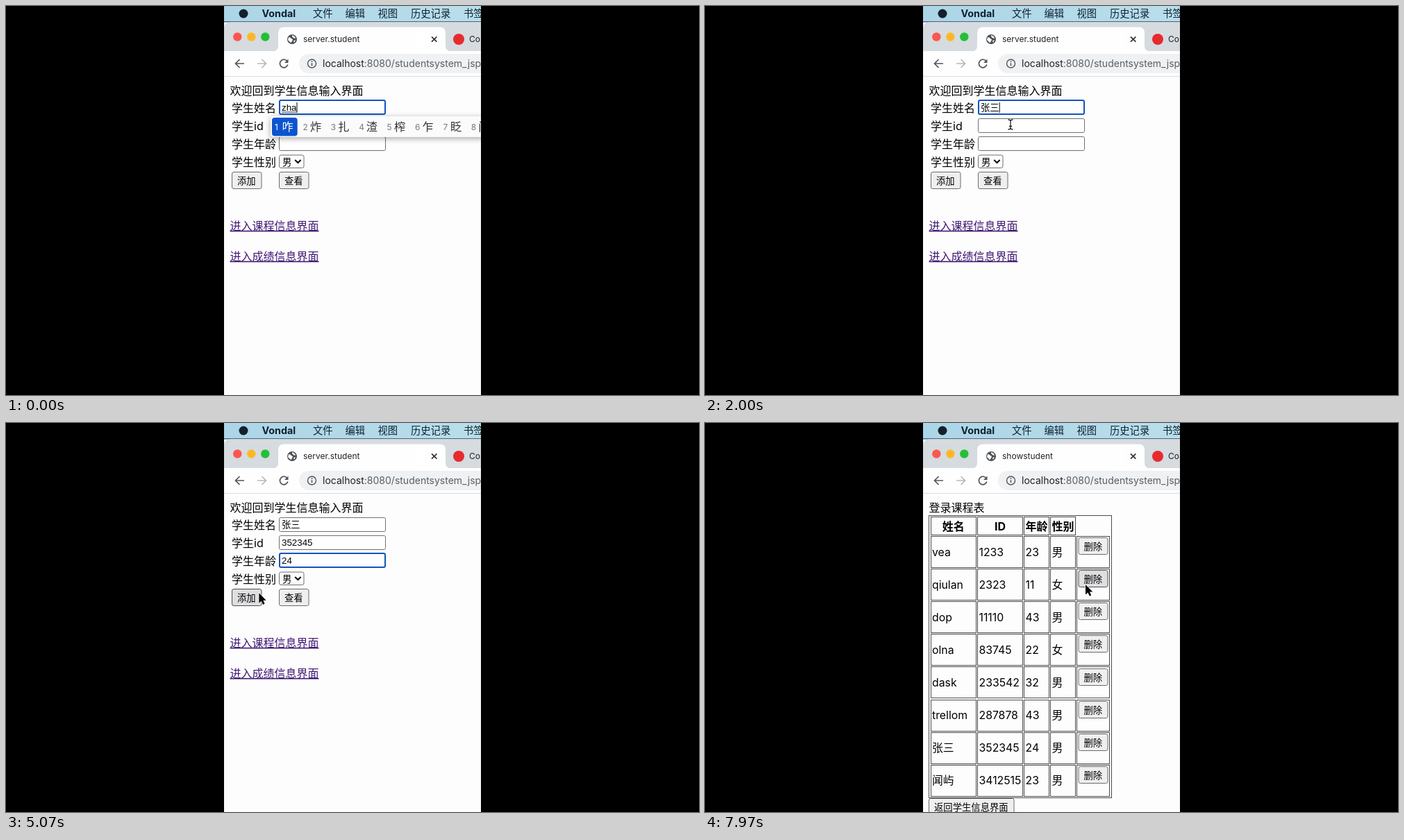
Animation of 998x561 px, one loop 8 s. Source, as an HTML page:

```html
<!DOCTYPE html>
<html lang="zh-CN">
<head>
<meta charset="utf-8">
<title>Student form</title>
<style>
html, body { margin: 0; width: 100%; height: 100%; overflow: hidden; background: #000; }
svg { display: block; width: 998px; height: 561px; }
text { font-family: Inter, "Noto Sans CJK SC", "Noto Sans CJK", sans-serif; font-size: 16px; fill: #000; white-space: pre; }
.field { font-family: "Liberation Sans", "Noto Sans CJK SC", "Noto Sans CJK", sans-serif; font-size: 13.33px; }
.menu { font-size: 14.3px; fill: #10222f; }
.tab { font-size: 12px; fill: #222; }
.url { font-size: 14px; fill: #5b5f64; }
.link { fill: #3f1773; text-decoration: underline; text-decoration-thickness: 1px; text-underline-offset: 2px; }
.bold { font-weight: 700; }
.icon { fill: none; stroke: #50555a; stroke-width: 1.7; }
</style>
</head>
<body>
<svg viewBox="0 0 998 561">
  <defs>
    <clipPath id="view"><rect x="314" width="370" height="561"/></clipPath>
    <linearGradient id="fade"><stop offset="0" stop-color="#fff" stop-opacity="0"/><stop offset="1" stop-color="#fff"/></linearGradient>
    <linearGradient id="sky"><stop offset="0" stop-color="#acd5e8"/><stop offset="1" stop-color="#b9deeb"/></linearGradient>
    <filter id="soft" x="-10%" y="-50%" width="120%" height="220%"><feDropShadow dx="0" dy="2" stdDeviation="4" flood-opacity=".35"/></filter>
  </defs>
  <rect width="998" height="561"/>
  <g clip-path="url(#view)">
    <rect x="314" width="370" height="561" fill="#fdfdfd"/>
    <g id="shell"></g>
    <g id="live"></g>
    <g id="mouse"></g>
  </g>
</svg>
<script>
const LOOP = 8000;
const $ = id => document.getElementById(id);
const text = (x, y, s, cls = '', extra = '') => `<text x="${x}" y="${y}" class="${cls}" ${extra}>${s}</text>`;
const rect = (x, y, w, h, fill, extra = '') => `<rect x="${x}" y="${y}" width="${w}" height="${h}" fill="${fill}" ${extra}/>`;
const circle = (x, y, r, fill) => `<circle cx="${x}" cy="${y}" r="${r}" fill="${fill}"/>`;
const path = (d, extra = 'class="icon"') => `<path d="${d}" ${extra}/>`;
const box = (x, y, w, h) => rect(x, y, w, h, 'none', 'stroke="#4a4a4a" shape-rendering="crispEdges"');

// Browser window
const menus = [[442, '文件'], [488.5, '编辑'], [535.5, '视图'], [583, '历史记录'], [659, '书签']];
$('shell').innerHTML =
  rect(314, 0, 370, 24, 'url(#sky)') + rect(314, 22, 370, 1.2, '#49647b') +
  circle(342, 11, 6.5, '#14202a') +
  text(368.5, 16, 'Vondal', 'menu bold') +
  menus.map(([x, s]) => text(x, 16.2, s, 'menu')).join('') +
  path('M314 66V33Q314 23 324 23H690V66Z', 'fill="#d5dbdf"') +
  ['#fc5650', '#fdb827', '#24bf38'].map((c, i) => circle(333.3 + i * 20, 44.5, 6.2, c)).join('') +
  path('M384 65.5Q392 65.5 392 57V39Q392 30.5 400 30.5H625Q633 30.5 633 39V57Q633 65.5 641 65.5Z', 'fill="#fefefe"') +
  path('M613 44.3l7.4 7.4m0-7.4l-7.4 7.4', 'class="icon" style="stroke:#333"') +
  circle(652, 48, 8, '#e62b2e') + text(667, 52, 'Co', 'tab') +
  rect(314, 65, 370, 36, '#fefefe') + rect(314, 101, 370, 1, '#d9dbea') +
  path('M343 83H330.5M336.5 77L330.5 83l6 6') +
  path('M362 83h12.5M368.5 77l6 6-6 6', 'class="icon" style="stroke:#b6b8bb"') +
  rect(422, 69, 290, 28, '#eff1f3', 'rx="14"') +
  '<circle cx="440.5" cy="83" r="6" class="icon" style="stroke-width:1.4"/>' +
  path('M440.5 82.3v4M440.5 79.3v1.6', 'class="icon" style="stroke-width:1.5"') +
  text(456, 88, '<tspan fill="#202124">localhost</tspan>:8080/studentsystem_jsp', 'url');

// Page state changes: [ms, patch]
const steps = [
  [0, { page: 'form', focus: 'name', name: 'zha', id: '', age: '', ime: '咋炸扎渣榨乍眨闸', load: 0, title: 'server.student', msg: '欢迎回到学生信息输入界面', press: '' }],
  [100, { name: 'zhan', ime: '站占战展沾粘斩盏' }],
  [200, { name: 'zhang', ime: '张长章掌涨仗账帐' }],
  [370, { name: 'zhang s', ime: ['张三', '张', '长', '章', '掌', '涨'] }],
  [470, { name: 'zhang sa' }],
  [600, { name: 'zhang san' }],
  [830, { name: '张三', ime: '' }],
  [2030, { focus: 'id' }],
  ...[...'352345'].map((c, i) => [2300 + i * 136, { id: '352345'.slice(0, i + 1) }]),
  [3570, { focus: 'age' }],
  [3900, { age: '2' }],
  [4300, { age: '24' }],
  [5300, { focus: '', press: 'add' }],
  [5400, { press: '', load: 1, title: 'localhost:8080/studentsystem' }],
  [5600, { msg: '成功添加！', name: '', id: '', age: '', title: 'server.student' }],
  [5830, { load: 0 }],
  [6900, { press: 'view' }],
  [6970, { press: '', load: 1, title: 'localhost:8080/studentsystem' }],
  [7270, { page: 'list', title: 'showstudent' }],
  [7500, { load: 0 }]
];
const rows = [
  ['vea', 1233, 23, '男'], ['qiulan', 2323, 11, '女'], ['dop', 11110, 43, '男'], ['olna', 83745, 22, '女'],
  ['dask', 233542, 32, '男'], ['trellom', 287878, 43, '男'], ['张三', 352345, 24, '男'], ['闻屿', 3412515, 23, '男']
];
const cols = [[325, 65.5], [392.5, 65], [459.5, 36], [497.5, 36], [535.5, 47]];

// Pointer keys: [ms, x, y]
const trail = [
  [1700, 456, 152], [1950, 440, 171], [3030, 440, 173], [3170, 437, 188], [4470, 437, 188], [5000, 364.5, 245],
  [5200, 364, 246], [6000, 364, 246], [6170, 386, 252], [6430, 400, 253], [7500, 400, 253], [7930, 548, 233], [8000, 548, 233]
];
const shown = [[1700, 2300], [3040, 3900], [4470, 8000]];

function pointer(t) {
  if (!shown.some(([a, b]) => t >= a && t < b)) return null;
  const i = trail.findIndex(k => k[0] > t);
  const [a, x, y] = trail[i - 1], [b, u, v] = trail[i];
  const p = (t - a) / (b - a), e = p * p * (3 - 2 * p);
  return { x: x + (u - x) * e, y: y + (v - y) * e };
}

const within = (p, x, y, w, h) => p && p.x >= x && p.x <= x + w && p.y >= y && p.y <= y + h;
const pen = document.createElement('canvas').getContext('2d');
pen.font = '13.33px "Liberation Sans", "Noto Sans CJK SC", "Noto Sans CJK", sans-serif';

function button(x, y, w, label, p, pressed) {
  const over = within(p, x, y, w, 25);
  return rect(x + .5, y + .5, w - 1, 24, pressed ? '#f5f5f5' : over ? '#dfdfe2' : '#efefef', `rx="2.5" stroke="${over ? '#4c4c4c' : '#6b6b6b'}"`) +
    text(x + 8, y + 17.6, label, 'field');
}

function input(y, value, focused, caret, composing) {
  const w = pen.measureText(value).width;
  return (focused ? rect(394, y, 152, 20, '#fff', 'rx="2" stroke="#1253be" stroke-width="2"')
    : rect(393.5, y + .5, 153, 20, '#fff', 'rx="2" stroke="#6f6f6f"')) +
    text(397, y + 14.6, value, 'field') +
    (composing ? rect(397, y + 16.5, w, 1, '#333') : '') +
    (focused && caret ? rect(397 + w, y + 3, 1, 15, '#000') : '');
}

function candidates(words) {
  let x = 387, out = rect(381, 159, 330, 30, '#fbfbfb', 'rx="5" filter="url(#soft)"');
  [...words].forEach((s, i) => {
    const w = s.length * 16.2;
    if (!i) out += rect(383, 161, w + 20.5, 26.5, '#0c54cf', 'rx="4"');
    out += text(x, 178.5, i + 1, '', `style="font-size:12px;fill:${i ? '#777' : '#fff'}"`) +
      text(x + 10.5, 180, s, '', `style="font-size:16.2px;fill:${i ? '#333' : '#fff'}"`);
    x += w + 24.2;
  });
  return out;
}

function form(s, p, caret) {
  const labels = ['学生姓名', '学生id', '学生年龄', '学生性别'];
  return text(322.5, 127.6, s.msg) +
    labels.map((l, i) => text(325, 152.6 + i * 26.1, l)).join('') +
    ['name', 'id', 'age'].map((k, i) => input(136 + i * 26, s[k], s.focus === k, caret, s.ime && k === 'name')).join('') +
    rect(393.5, 215, 35.5, 18.5, '#fdfdfd', 'rx="2.5" stroke="#6f6f6f"') + text(398, 230, '男', 'field') +
    path('M416.2 222l4.2 4 4.2-4', 'fill="none" stroke="#000" stroke-width="2"') +
    button(325, 239, 43.5, '添加', p, s.press === 'add') + button(393, 239, 43.5, '查看', p, s.press === 'view') +
    text(322.5, 322.8, '进入课程信息界面', 'link') + text(322.5, 366.8, '进入成绩信息界面', 'link') +
    (s.ime ? candidates(s.ime) : '');
}

function list(p) {
  const heads = ['姓名', 'ID', '年龄', '性别'];
  let out = text(322.5, 127.6, '登录课程表') + box(322.5, 133.5, 263, 407);
  heads.forEach((h, i) => {
    const [x, w] = cols[i];
    out += box(x, 135.5, w, 25.5) + text(x + w / 2, 154.6, h, 'bold', 'text-anchor="middle"');
  });
  rows.forEach((r, n) => {
    const y = 163.5 + n * 47.1;
    cols.forEach(([x, w], i) => {
      out += box(x, y, w, 45) + (i < 4 ? text(x + 2, y + 28.2, r[i], '', 'style="font-size:15.8px"') : '');
    });
    out += button(537.5, Math.round(y + 1.6), 43, '删除', p);
  });
  return out + button(322, 541, 123.5, '返回学生信息界面', p);
}

function tab(s, t) {
  const globe = circle(412, 48, 7, '#4b5055') +
    path('M407 45q3 0 4 2l2 1-1 3-2 2-4-4zM412 42l4 2 1 3-3-1-2-2zM414 50l3-1-2 4z', 'fill="#fefefe"');
  const spin = `<circle cx="412" cy="48" r="7" class="icon" style="stroke:#8a8e93" stroke-dasharray="6 38" transform="rotate(${-16 - (t % 900) * .4} 412 48)"/>`;
  const stop = path('M394.5 77.5l11 11m0-11l-11 11');
  const reload = path('M405.3 80.2A5.8 5.8 0 1 0 405.8 84.5') + path('M406.5 76.5v5.5h-5.5z', 'fill="#50555a"');
  return (s.load ? spin + stop : globe + reload) + text(428, 52.3, s.title, 'tab') +
    rect(580, 36, 24, 24, 'url(#fade)') + rect(604, 38, 5, 20, '#fefefe');
}

function cursor(p, s) {
  if (!p) return '';
  const beam = s.page === 'form' && within(p, 393, 135, 154, 74);
  const d = beam ? 'M-3.5-7Q0-7 0-5Q0-7 3.5-7M0-5V5M-3.5 7Q0 7 0 5Q0 7 3.5 7M-2 2.5H2'
    : 'M0 0V14.5L3.4 11.4L5.7 16.6L8.2 15.5L6 10.4H10.3Z';
  const look = beam ? 'fill="none" stroke="#222" stroke-width="1.3"' : 'stroke="#fff" stroke-width="1.2" paint-order="stroke"';
  return `<g transform="translate(${p.x.toFixed(2)} ${p.y.toFixed(2)})">${path(d, look)}</g>`;
}

let last = '';
function draw(t) {
  const s = {};
  let typed = 0;
  for (const [at, patch] of steps) {
    if (at > t) break;
    Object.assign(s, patch);
    if (['focus', 'name', 'id', 'age'].some(k => k in patch)) typed = at;
  }
  const p = pointer(t), caret = Math.floor((t - typed) / 500) % 2 === 0;
  const html = tab(s, t) + (s.page === 'form' ? form(s, p, caret) : list(p));
  if (html !== last) $('live').innerHTML = last = html;
  $('mouse').innerHTML = cursor(p, s);
}

const start = performance.now();
function tick() {
  draw((performance.now() - start) % LOOP);
  requestAnimationFrame(tick);
}
tick();
</script>
</body>
</html>
```
